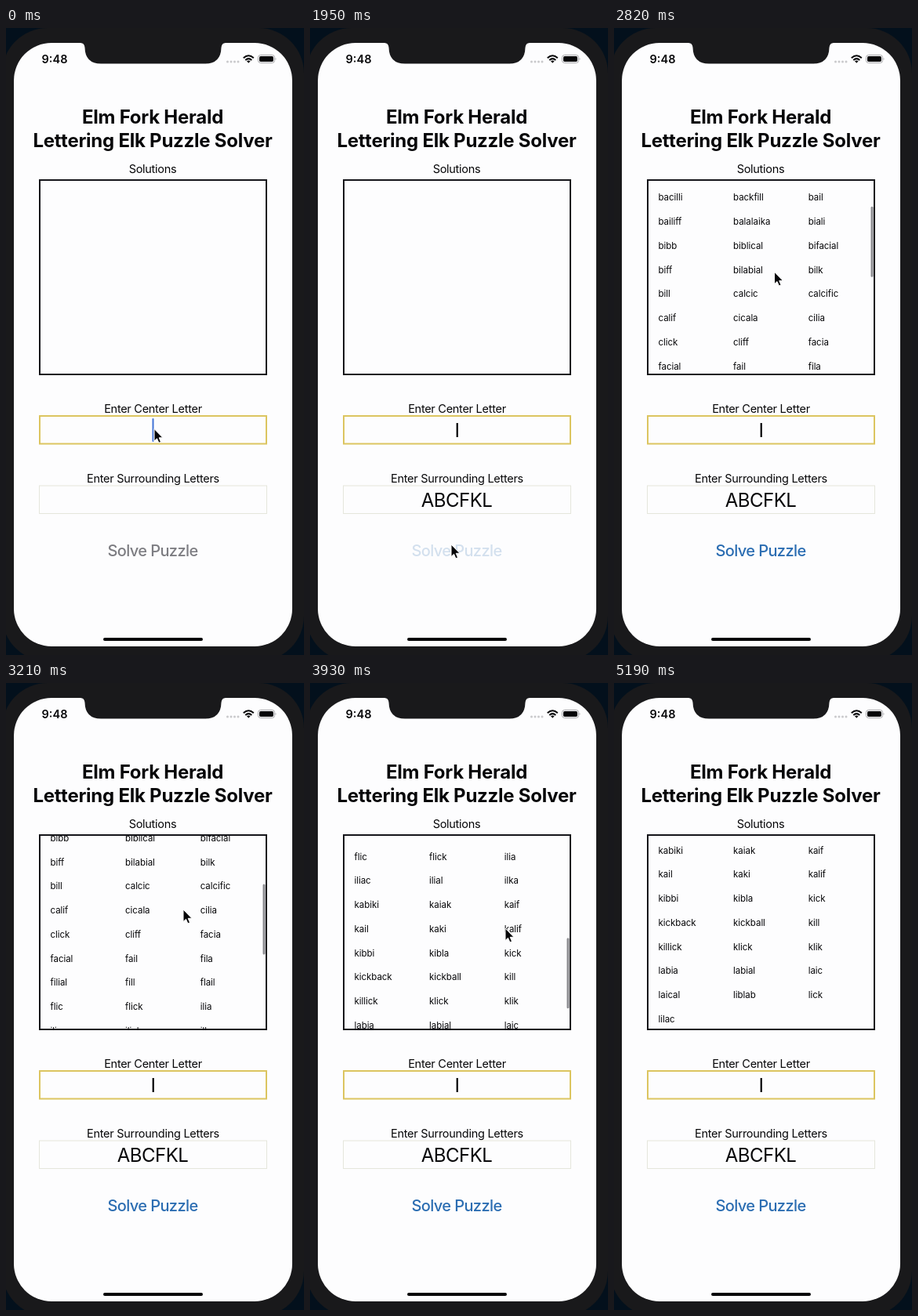
Recreate the animation shown at these times as an HTML page. Size 380 px wide and 800 px high, loop 5220 ms.

```html
<!DOCTYPE html>
<html lang="en">
<head>
<meta charset="utf-8">
<title>Puzzle solver</title>
<style>
  html, body { margin: 0; width: 100%; height: 100%; overflow: hidden; background: #03101c; }
  svg { display: block; width: 100vw; height: 100vh; }
  text { font-family: Inter, Roboto, "Liberation Sans", sans-serif; fill: #060608; }
  .mid { text-anchor: middle; }
  .title { font-size: 24px; font-weight: 700; letter-spacing: -.25px; }
  .label { font-size: 14.5px; letter-spacing: -.28px; }
  .entry { font-size: 24px; letter-spacing: -.5px; }
  .button { font-size: 20px; font-weight: 500; letter-spacing: -.6px; }
  .word { font-size: 11.5px; letter-spacing: -.05px; }
  .clock { font-size: 14.5px; font-weight: 600; }
</style>
</head>
<body>
<svg viewBox="0 0 380 800">
  <defs><clipPath id="listClip"><rect x="44" y="195" width="287" height="246"/></clipPath></defs>

  <rect x="-5" width="385" height="808" rx="58" fill="#19191b"/>
  <rect x="10" y="19" width="355" height="770" rx="48" fill="#fdfdfe"/>
  <path fill="#19191b" d="M95 18V19Q100 19 100.500 25Q101 45.500 121 45.500H254Q274 45.500 274.500 25Q275 19 280 19V18Z"/>

  <text class="clock mid" x="62" y="44.500">9:48</text>
  <g fill="#c9c9cc">
    <circle cx="282.500" cy="43" r="1.500"/><circle cx="287" cy="43" r="1.500"/>
    <circle cx="291.500" cy="43" r="1.500"/><circle cx="296" cy="43" r="1.500"/>
  </g>
  <g fill="none" stroke="#060608" stroke-width="2">
    <path d="M302.800 38.300Q309.300 32.300 315.800 38.300M305.300 40.900Q309.300 37.300 313.300 40.900"/>
    <path d="M307 42.300L309.300 44.800 311.600 42.300Q309.300 40.600 307 42.300Z" fill="#060608" stroke="none"/>
  </g>
  <rect x="321.500" y="34.500" width="21" height="10" rx="3" fill="none" stroke="#a5a5a8"/>
  <rect x="323" y="36" width="18" height="7" rx="1.700" fill="#060608"/>
  <path d="M343.700 37.800Q345.500 39.500 343.700 41.300Z" fill="#a5a5a8"/>

  <text class="title mid" x="187" y="122">Elm Fork Herald</text>
  <text class="title mid" x="187" y="152">Lettering Elk Puzzle Solver</text>
  <text class="label mid" x="187" y="185">Solutions</text>
  <g clip-path="url(#listClip)">
    <g id="list"></g>
    <rect id="thumb" x="327.500" width="3" height="90" rx="1.500" fill="#8e8e92"/>
  </g>
  <rect x="43" y="194" width="289" height="248" fill="none" stroke="#15151a" stroke-width="2"/>

  <text class="label mid" x="187.500" y="490.500">Enter Center Letter</text>
  <rect x="43" y="495" width="289" height="35.500" fill="none" stroke="#dcc560" stroke-width="2"/>
  <text id="center" class="entry mid" x="187.500" y="521.500"></text>

  <text class="label mid" x="187.500" y="579.500">Enter Surrounding Letters</text>
  <rect x="42.500" y="584" width="290" height="35.500" fill="none" stroke="#e5e6dc"/>
  <text id="around" class="entry mid" x="187" y="610.500"></text>

  <text id="solve" class="button mid" x="187" y="673.500">Solve Puzzle</text>
  <rect x="124" y="778" width="127" height="4" rx="2" fill="#060608"/>
  <rect id="caret" width="2" height="30" rx="1" fill="#4274d6"/>
  <path id="pointer" d="M0 0V15.500L3.500 12.300 5.900 17.800 8.500 16.700 6.200 11.300H11Z"
        fill="#060608" stroke="#fff" stroke-width="1" stroke-linejoin="round"/>
</svg>
<script>
const LOOP = 5220, ROW = 30.75;
const words = `aalii abaci acai alcaic alfaki alibi alif alkali alkalic
  bacilli backfill bail bailiff balalaika biali bibb biblical bifacial
  biff bilabial bilk bill calcic calcific calif cicala cilia
  click cliff facia facial fail fila filial fill flail flic flick ilia
  iliac ilial ilka kabiki kaiak kaif kail kaki kalif kibbi kibla kick
  kickback kickball kill killick klick klik labia labial laic
  laical liblab lick lilac`.split(/\s+/);

const el = id => document.getElementById(id);
const [list, thumb, center, around, solve, caret, pointer] =
  ["list", "thumb", "center", "around", "solve", "caret", "pointer"].map(el);

words.forEach((word, i) => {
  const text = document.createElementNS("http://www.w3.org/2000/svg", "text");
  text.setAttribute("class", "word");
  text.setAttribute("x", 56.5 + (i % 3) * 95.6);
  text.setAttribute("y", 217.5 + Math.floor(i / 3) * ROW);
  text.textContent = word;
  list.append(text);
});

const smooth = u => u * u * (3 - 2 * u);
const linear = u => u;

// Keys are [time, ...values]; returns the values at time t.
function track(t, keys, ease) {
  const next = keys.findIndex(key => key[0] > t);
  if (next < 0) return keys.at(-1).slice(1);
  if (next === 0) return keys[0].slice(1);
  const a = keys[next - 1], b = keys[next];
  const u = ease((t - a[0]) / (b[0] - a[0]));
  return a.slice(1).map((v, i) => v + (b[i + 1] - v) * u);
}

const pointerPath = [
  [0, 189, 511.5], [380, 189, 511.5], [660, 194, 604], [1500, 194, 604],
  [1840, 180, 659], [2040, 180, 659], [2420, 196, 320], [2610, 196, 320],
  [3210, 226, 289], [3930, 249, 313], [4350, 249, 313], [4700, 392, 340]
];
const scrollPath = [
  [2440, 0], [2610, 46], [3210, 169], [3930, 360.5], [4080, 400], [4200, 421], [4320, 430.5]
];

function placeCaret(field, top) {
  const width = field.textContent ? field.getComputedTextLength() : 0;
  caret.setAttribute("x", 186.5 + width / 2);
  caret.setAttribute("y", top);
}

function draw(t) {
  center.textContent = t >= 300 ? "I" : "";
  around.textContent = "ABCFKL".slice(0, Math.max(0, Math.floor((t - 850) / 100)));

  const inCenter = t < 660, inAround = t >= 780 && t < 1580;
  caret.style.display = inCenter || inAround ? "" : "none";
  if (inCenter) placeCaret(center, 498);
  else placeCaret(around, 587);

  const pressed = t >= 1890 && t < 2040;
  solve.style.fill = pressed ? "#d3e0ee" : t >= 1450 ? "#2b6db2" : "#7d7d82";

  const [scroll] = track(t, scrollPath, linear);
  list.style.display = t >= 2070 ? "" : "none";
  list.setAttribute("transform", `translate(0 ${-scroll})`);
  thumb.setAttribute("y", 195.5 + scroll * .36);
  thumb.setAttribute("opacity", track(t, [[2440, 0], [2500, 1], [4550, 1], [4850, 0]], linear)[0]);

  const [x, y] = track(t, pointerPath, smooth);
  pointer.setAttribute("transform", `translate(${x} ${y})`);
}

const start = performance.now();
function tick() {
  draw((performance.now() - start) % LOOP);
  requestAnimationFrame(tick);
}
tick();
</script>
</body>
</html>
```
